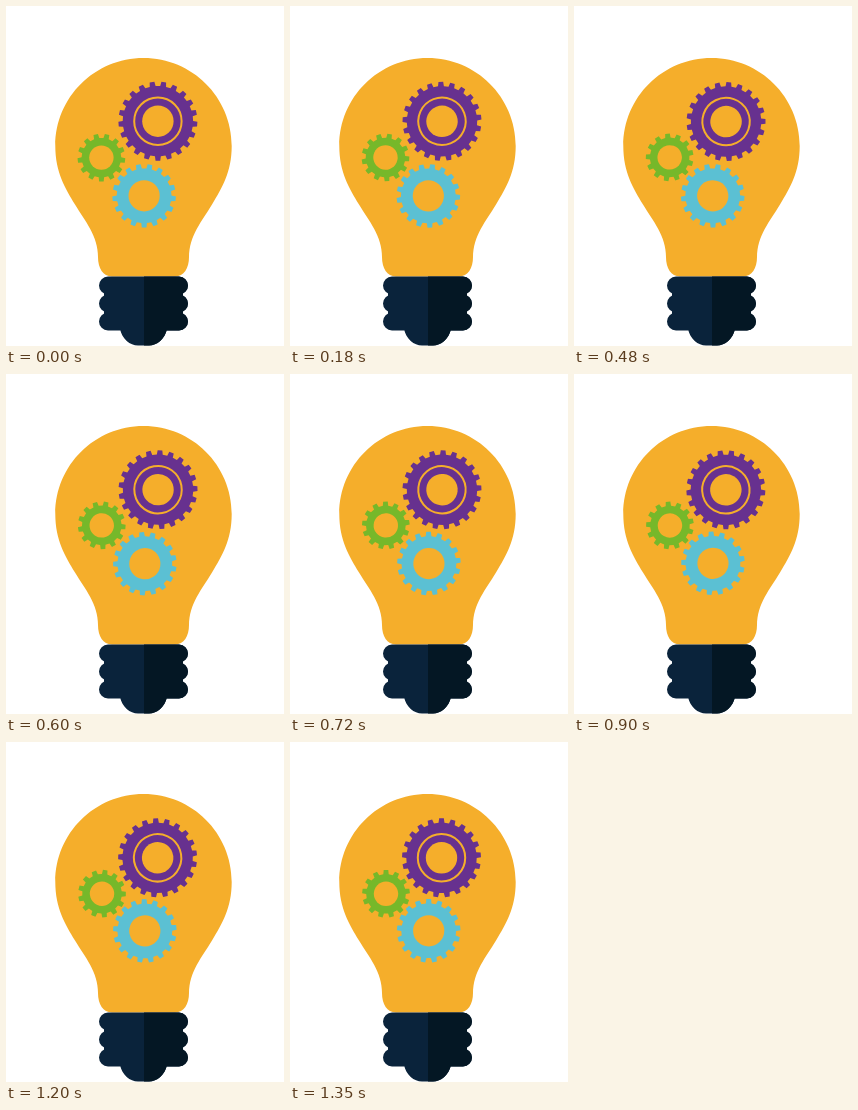
These frames come from a looping animation (278x340 px, 1450 ms). An HTML page with a canvas:

```html
<!DOCTYPE html>
<html lang="en">
<head>
<meta charset="utf-8">
<title>Light bulb with gears</title>
<style>
html, body { margin: 0; width: 100%; height: 100%; overflow: hidden; background: #fff; }
canvas { display: block; width: 278px; height: 340px; }
</style>
</head>
<body>
<canvas id="stage" width="278" height="340"></canvas>
<script>
const ctx = document.getElementById('stage').getContext('2d');
const LOOP = 1450, STEP = 30, LAST_STEP = 45;
const DEGREES_PER_STEP = 4;
const AMBER = '#f5ae2b';
const CENTER = 137.5;

// wobble: offset of the axle from the gear centre, turning with the gear
const gears = [
  { x: 151.7, y: 115.5, color: '#67318f', teeth: 21, outer: 39.5, root: 35.2, hole: 15.7, ring: 23.7, dir: 1, wobble: [0.2, -0.3] },
  { x: 95.7, y: 151.7, color: '#76b82a', teeth: 13, outer: 23.9, root: 19.8, hole: 12.2, dir: 1, wobble: [-0.3, -0.1] },
  { x: 138.4, y: 189.3, color: '#5bc0d3', teeth: 17, outer: 31.8, root: 27.4, hole: 15.6, dir: -1, wobble: [-0.3, 0.5] }
];

function disc(x, y, r, color) {
  ctx.fillStyle = color;
  ctx.beginPath();
  ctx.arc(x, y, r, 0, Math.PI * 2);
  ctx.fill();
}

function drawBulb() {
  ctx.fillStyle = AMBER;
  ctx.beginPath();
  ctx.moveTo(CENTER, 52);
  ctx.bezierCurveTo(186, 52, 225.7, 91, 225.7, 140);
  ctx.bezierCurveTo(225.7, 166, 216, 182, 206, 198.5);
  ctx.bezierCurveTo(196, 215, 183, 230, 183, 251);
  ctx.bezierCurveTo(183, 262, 178, 270.5, 169, 270.5);
  ctx.lineTo(106, 270.5);
  ctx.bezierCurveTo(97, 270.5, 92, 262, 92, 251);
  ctx.bezierCurveTo(92, 230, 79, 215, 69, 198.5);
  ctx.bezierCurveTo(59, 182, 49.3, 166, 49.3, 140);
  ctx.bezierCurveTo(49.3, 91, 89, 52, CENTER, 52);
  ctx.fill();
}

function baseShape() {
  ctx.beginPath();
  for (const y of [270.5, 288.5, 306.5]) ctx.roundRect(93, y, 89, 18, 9);
  ctx.rect(98, 275, 79, 44);
  ctx.moveTo(114, 318);
  ctx.lineTo(161, 318);
  ctx.lineTo(161, 323);
  ctx.bezierCurveTo(159, 333, 151, 339.5, 143, 339.5);
  ctx.lineTo(132, 339.5);
  ctx.bezierCurveTo(124, 339.5, 116, 333, 114, 323);
  ctx.closePath();
}

function drawBase() {
  ctx.save();
  baseShape();
  ctx.clip();
  ctx.fillStyle = '#0a233b';
  ctx.fillRect(90, 265, 95, 75);
  ctx.fillStyle = '#041724';
  ctx.fillRect(138, 265, 47, 75);
  ctx.restore();
}

function drawGear(gear, turn) {
  ctx.save();
  ctx.translate(gear.x, gear.y);
  ctx.rotate(turn * gear.dir);
  ctx.translate(...gear.wobble);

  const pitch = Math.PI * 2 / gear.teeth;
  const corners = [[-0.28, gear.root], [-0.2, gear.outer], [0.2, gear.outer], [0.28, gear.root]];
  ctx.fillStyle = gear.color;
  ctx.beginPath();
  for (let i = 0; i < gear.teeth; i++) {
    const mid = -Math.PI / 2 + (i + 0.5) * pitch;
    for (const [shift, radius] of corners) {
      const angle = mid + shift * pitch;
      ctx.lineTo(radius * Math.cos(angle), radius * Math.sin(angle));
    }
  }
  ctx.closePath();
  ctx.fill();

  disc(0, 0, gear.hole, AMBER);
  if (gear.ring) {
    ctx.strokeStyle = AMBER;
    ctx.lineWidth = 2;
    ctx.beginPath();
    ctx.arc(0, 0, gear.ring, 0, Math.PI * 2);
    ctx.stroke();
  }
  ctx.restore();
}

function draw() {
  const time = performance.now() % LOOP;
  const step = Math.min(LAST_STEP, Math.floor(time / STEP));
  const turn = step * DEGREES_PER_STEP * Math.PI / 180;
  ctx.fillStyle = '#fff';
  ctx.fillRect(0, 0, 278, 340);
  drawBulb();
  drawBase();
  for (const gear of gears) drawGear(gear, turn);
  requestAnimationFrame(draw);
}

draw();
</script>
</body>
</html>
```
